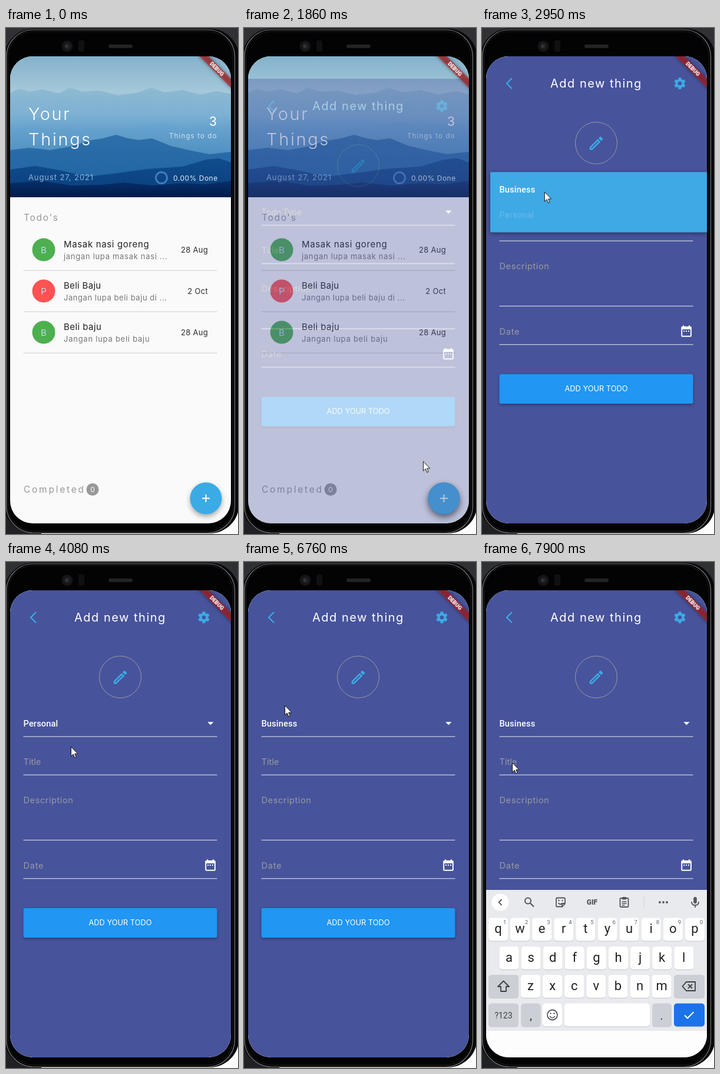
An HTML page for the animation above (8000 ms loop, 394 by 858 pixels).

```html
<!DOCTYPE html>
<html lang="en">
<head>
<meta charset="utf-8">
<title>Todo app</title>
<style>
html, body { margin: 0; width: 100%; height: 100%; overflow: hidden; background: #fff; }
svg { display: block; width: 394px; height: 858px; font-family: Inter, sans-serif; }
.rb { font-family: Roboto, sans-serif; }
.mid { text-anchor: middle; }
.end { text-anchor: end; }
</style>
</head>
<body>
<svg id="stage" viewBox="0 0 394 858"></svg>
<script>
const LOOP = 8000;
const ACCENT = '#3babe6', PAGE = '#47539b', HINT = '#999ba1';

// Timeline: each track is a list of [ms, css] turned into CSS keyframes.
let css = '';
function track(name, frames, ease = 'linear') {
  const body = frames.map(([ms, rule]) => `${ms / LOOP * 100}% {${rule}}`).join(' ');
  css += `@keyframes ${name} {${body}} .${name} {animation: ${name} ${LOOP}ms ${ease} infinite}\n`;
}
const op = v => `opacity:${v}`;
const fade = (name, a, b, c, d) =>
  track(name, [[0, op(0)], [a, op(0)], [b, op(1)], [c, op(1)], [d, op(0)], [LOOP, op(0)]]);
const show = (name, a, b) =>
  track(name, [[0, op(a ? 0 : 1)], [a || 1, op(1)], [b, op(b < LOOP ? 0 : 1)]], 'step-end');

// Drawing helpers
const text = (x, y, size, str, fill, ls = 0, more = '') =>
  `<text x="${x}" y="${y}" font-size="${size}" fill="${fill}" letter-spacing="${ls}" ${more}>${str}</text>`;
const rect = (x, y, w, h, fill, r = 0, more = '') =>
  `<rect x="${x}" y="${y}" width="${w}" height="${h}" rx="${r}" fill="${fill}" ${more}/>`;
const circle = (x, y, r, fill, more = '') =>
  `<circle cx="${x}" cy="${y}" r="${r}" fill="${fill}" ${more}/>`;
const path = (d, fill, more = '') => `<path d="${d}" fill="${fill}" ${more}/>`;
const line = (d, color, w, more = '') =>
  path(d, 'none', `stroke="${color}" stroke-width="${w}" ${more}`);
const group = (inner, more = '') => `<g ${more}>${inner}</g>`;
const grad = (id, ...stops) =>
  `<linearGradient id="${id}" x2="0" y2="1">${stops.map(([o, c]) =>
    `<stop offset="${o}" stop-color="${c}"/>`).join('')}</linearGradient>`;

const defs = `<defs>
  <clipPath id="screen">${rect(7, 48, 375, 792, '#000', 38)}</clipPath>
  <clipPath id="fab">${circle(339.5, 797.5, 27, '#000')}</clipPath>
  ${grad('sky', [0, '#84b2cb'], [.25, '#a5c8da'], [.45, '#86b6d5'], [1, '#3f86bd'])}
  ${grad('far', [0, '#8fbad1'], [.25, '#7cb0d3'], [.6, '#4389c0'], [1, '#2f78b3'])}
  ${grad('haze', [0, '#6ba6d0'], [1, '#2c73af'])}
  ${grad('peak', [0, '#2d6fa8'], [1, '#1c62a3'])}
  ${grad('hill', [0, '#104c8b'], [1, '#0a3f7d'])}
  ${grad('front', [0, '#06306a'], [1, '#011b4b'])}
</defs>`;

function phone() {
  return rect(0, 0, 394, 858, '#fcfcfc') + rect(0, 0, 394, 60, '#303135')
    + rect(0, 780, 60, 78, '#202124')
    + rect(-3, 1, 399, 856, '#08080a', 50)
    + rect(.8, 3, 387.7, 853, '#050506', 46, 'stroke="#77797c" stroke-width="1.2"')
    + rect(3.5, 6, 382, 847, '#030303', 43, 'stroke="#1b1c1e"')
    + circle(104, 31, 9.5, '#151517') + circle(104, 31, 5, '#232326') + circle(103, 31, 2, '#3c3c42')
    + rect(123, 21, 10, 19, '#101012', 3)
    + rect(174, 28, 41, 6, '#222325', 3);
}

function ridge(points, fill) {
  return path(`M7 287 L${points} L382 287Z`, fill);
}

function header() {
  return rect(7, 48, 375, 239, 'url(#sky)')
    + ridge('7 110 22 103 40 108 62 104 90 111 108 101 130 108 158 106 190 114 222 110 246 101 270 109 300 105 330 113 358 107 382 112', 'url(#far)')
    + ridge('7 172 50 166 95 176 140 170 190 178 245 163 270 160 300 170 345 165 382 172', 'url(#haze)')
    + ridge('7 207 40 203 75 207 110 201 140 191 165 187 187 181 207 187 226 190 248 187 280 200 310 207 345 214 382 210', 'url(#peak)')
    + ridge('7 240 50 234 90 241 140 252 190 246 240 239 300 235 340 223 362 221 382 228', 'url(#hill)')
    + ridge('7 263 60 259 110 267 160 266 200 262 250 267 300 263 340 265 382 259', 'url(#front)')
    + text(38, 156, 29, 'Your', '#fff', 2.6, 'font-weight="300"')
    + text(38, 199, 29, 'Things', '#fff', 2.7, 'font-weight="300"')
    + text(358, 166, 21, '3', '#fff', 0, 'class="end"')
    + text(277, 187, 11.5, 'Things to do', '#d3e2ef', 1.15)
    + text(38, 258, 13, 'August 27, 2021', '#8fb2d6', .9)
    + circle(264, 254, 9.5, 'none', 'stroke="#3f7fbd" stroke-width="3"')
    + text(284, 259, 12, '0.00% Done', '#e3ecf5', .5);
}

function todo(y, color, name, ls, note, noteLs, date) {
  return circle(64, y, 19.5, color)
    + text(64, y + 6, 15, name[0] === 'B' && date === '2 Oct' ? 'P' : 'B', '#b9dcf0', 0, 'class="mid"')
    + text(98, y - 4, 15, name, '#222', ls)
    + text(98, y + 15.5, 13, note, '#777', noteLs)
    + text(343, y + 4.5, 13, date, '#2c2c2c', .3, 'class="end"')
    + rect(29.5, y + 34.5, 329, 1.2, '#d3d6d3');
}

function home() {
  const splash = circle(0, 0, 56, '#fff', 'class="splash"');
  return rect(7, 48, 375, 792, '#fafafa') + header()
    + text(30, 326.5, 15.5, 'Todo\'s', '#999', 1.7)
    + todo(376, '#4caf50', 'Masak nasi goreng', .65, 'jangan lupa masak nasi ...', .7, '28 Aug')
    + todo(446, '#ff5252', 'Beli Baju', .3, 'Jangan lupa beli baju di ...', .55, '2 Oct')
    + todo(516, '#4caf50', 'Beli baju', .45, 'Jangan lupa beli baju', .75, '28 Aug')
    + text(30, 788, 15.5, 'Completed', '#999', 2.75)
    + circle(147, 782.5, 10.5, '#989898') + text(147, 787, 12, '0', '#fff', 0, 'class="mid"')
    + circle(339.5, 797.5, 27, ACCENT, 'style="filter:drop-shadow(0 4px 4px #0005)"')
    + circle(339.5, 797.5, 27, ACCENT, 'class="lift" style="filter:drop-shadow(0 6px 7px #0006)"')
    + group(group(splash, 'transform="translate(318 800)"'), 'clip-path="url(#fab)"')
    + line('M333 797.5h13M339.5 791v13', '#fff', 2);
}

function gear(x, y) {
  const teeth = [0, 60, 120].map(a => rect(-2.6, -9.8, 5.2, 19.6, ACCENT, 1, `transform="rotate(${a})"`)).join('');
  return group(teeth + circle(0, 0, 7.4, ACCENT) + circle(0, 0, 3.3, PAGE), `transform="translate(${x} ${y})"`);
}

const PENCIL = 'M14.06 9.02l.92.92L5.92 19H5v-.92l9.06-9.06M17.66 3c-.25 0-.51.1-.7.29l-1.83 1.83 3.75 3.75 1.83-1.83c.39-.39.39-1.02 0-1.41l-2.34-2.34c-.2-.2-.45-.29-.71-.29zm-3.6 3.19L3 17.25V21h3.75L17.81 9.94z';
const CALENDAR = 'M19 4h-1V2h-2v2H8V2H6v2H5q-2 0-2 2v14q0 2 2 2h14q2 0 2-2V6q0-2-2-2zm0 16H5V9h14zM9 11H7v2h2zm4 0h-2v2h2zm4 0h-2v2h2z';
const option = (y, str, cls = '') =>
  group(text(29.5, y, 14.6, str, '#fff', .15, 'class="rb" font-weight="500"'), `class="${cls}"`);

function form() {
  return rect(7, 48, 375, 792, PAGE)
    + line('M51 85l-9 9 9 9', ACCENT, 2.2)
    + text(116, 101, 20, 'Add new thing', '#fff', 1.5)
    + gear(336, 94)
    + circle(194, 195, 35.5, 'none', 'stroke="#9a9ca2" stroke-width="1"')
    + path(PENCIL, ACCENT, 'transform="translate(179 180.5) scale(1.25)"')
    + group(text(29.5, 278.5, 14.6, 'Todo Type', HINT, .15, 'class="rb"'), 'class="hint"')
    + option(278.5, 'Personal', 'first') + option(278.5, 'Business', 'second')
    + path('M342.3 271.3h10.2l-5.1 5.2z', '#fff')
    + text(29.5, 344, 14.6, 'Title', HINT)
    + text(29.5, 409, 14.6, 'Description', HINT, .55)
    + text(29.5, 520, 14.6, 'Date', HINT, .7)
    + path(CALENDAR, '#fff', 'fill-rule="evenodd" transform="translate(335.3 502.2) scale(.98)"')
    + [296, 361, 471.5, 536.7].map(y => rect(29.5, y - .6, 329, 1.3, '#c9ccdd')).join('')
    + rect(29.5, 587, 329, 50, '#2196f3', 3, 'style="filter:drop-shadow(0 2px 2px #0005)"')
    + text(194, 616, 12.8, 'ADD YOUR TODO', '#fff', 0, 'class="mid"');
}

// Dropdown: fades in at one row, grows to both rows, then the other row appears.
const ROW = 43.75, ROW_TOP = 251.6, PAD = 7.3;
function menu(id, selected, opens, closes) {
  const top = ROW_TOP - selected * ROW;
  const small = `y:${ROW_TOP}px;height:${ROW}px`;
  const full = `y:${top - PAD}px;height:${2 * ROW + 2 * PAD}px`;
  fade(id, opens, opens + 75, closes, closes + 75);
  track(id + 'box', [[0, small], [opens + 75, small], [opens + 150, full], [LOOP, full]]);
  fade(id + 'row', opens + 150, opens + 270, closes + 100, closes + 110);
  const rows = ['Business', 'Personal'].map((name, i) =>
    option(top + i * ROW + 26.9, name, i === selected ? '' : id + 'row')).join('');
  return group(rect(14, ROW_TOP, 369, ROW, '#3fa9e5', 2,
    `class="${id}box" style="filter:drop-shadow(0 2px 3px #0006)"`) + rows, `class="${id}"`);
}

function keyboard() {
  const INK = '#202124', GREY = '#cdcfd6', ICON = '#52575c';
  const key = (x, y, w, fill = '#fff') =>
    rect(x, y + 1, w, 39, '#c3c5ca', 5) + rect(x, y, w, 39, fill, 5);
  const label = (x, y, size, str, fill = INK, more = '') =>
    text(x, y, size, str, fill, 0, `class="rb mid" ${more}`);
  const row = (letters, x0, y) => [...letters].map((c, i) => {
    const x = x0 + i * 37.1;
    return key(x - 16.5, y, 33) + label(x, y + 25.5, 22, c);
  }).join('');
  const digits = [...'1234567890'].map((c, i) => label(38.6 + i * 37.1, 614, 9.5, c, '#5f6368')).join('');
  const tools = circle(31, 577, 14.5, '#fff') + line('M33.5 572l-5 5 5 5', ICON, 1.8)
    + circle(78, 574.5, 5, 'none', `stroke="${ICON}" stroke-width="2"`) + line('M82 578.5l6 6', ICON, 2.2)
    + line('M128 569.5h11q2 0 2 2v8l-5 5h-8q-2 0-2-2v-11q0-2 2-2zM141 579h-5v5M129.5 578q3 4 6 1', ICON, 1.8)
    + circle(130.5, 574, 1.2, ICON) + circle(136.5, 574, 1.2, ICON)
    + label(187, 581, 12, 'GIF', ICON, 'font-weight="900"')
    + rect(234.5, 570, 14, 15, 'none', 1.5, `stroke="${ICON}" stroke-width="1.8"`)
    + rect(238, 568, 7, 4.5, ICON, 1) + line('M237.5 576h8M237.5 579h8M237.5 582h5', ICON, 1.4)
    + rect(274.5, 567, 1, 20, '#cfd1d5')
    + [302, 308, 314].map(x => circle(x, 577, 1.9, ICON)).join('')
    + rect(359.2, 568, 5.6, 11, ICON, 2.8) + line('M356 576q0 6 6 6t6-6M362 582v4', ICON, 1.8);
  const bottom = key(11, 748.5, 51, GREY) + label(36.5, 773.5, 14, '?123', '#3c4043')
    + key(66.5, 748.5, 33, GREY) + label(83, 776, 19, ',')
    + key(103, 748.5, 33) + circle(119.5, 768, 8.5, 'none', `stroke="${ICON}" stroke-width="1.8"`)
    + circle(116.5, 765.5, 1.3, ICON) + circle(122.5, 765.5, 1.3, ICON)
    + line('M115 770q4.500 6 9 0', ICON, 1.6)
    + key(140, 748.5, 145) + key(289, 748.5, 33, GREY) + label(305, 776, 19, '.')
    + key(326, 748.5, 52, '#1a73e8') + line('M344 768.500l5 5 10.500-10.500', '#fff', 2);
  return rect(7, 556, 375, 240, '#e8eaed') + rect(7, 795, 375, 45, '#fdfdfd')
    + tools + row('qwertyuiop', 27.5, 603.5) + digits + row('asdfghjkl', 46, 652)
    + key(11, 700, 51, GREY)
    + line('M36.500 710.500l-9.500 9.500h5v8h9v-8h5z', '#3c4043', 1.8, 'stroke-linejoin="round"')
    + row('zxcvbnm', 82.5, 700)
    + key(326, 700, 52, GREY)
    + line('M347 712h15v15h-15l-6.500-7.500zM350 716l7 7M357 716l-7 7', '#3c4043', 1.8)
    + bottom;
}

function banner() {
  return group(rect(-50, -5.5, 100, 11, '#b71c1c', 0, 'fill-opacity=".66" style="filter:drop-shadow(0 0 3px #000a)"')
    + text(0, 3.4, 9.3, 'DEBUG', '#fff', 0, 'class="rb mid" font-weight="900"'),
    'transform="translate(358 69.500) rotate(45)"');
}

// Page change, button press and field value
track('rise', [[0, 'transform:translateY(198px)'],
  [1740, 'transform:translateY(198px);animation-timing-function:cubic-bezier(.4,0,.2,1)'],
  [1970, 'transform:none'], [LOOP, 'transform:none']]);
track('appear', [[0, op(0)], [1740, op(0) + ';animation-timing-function:ease-in'],
  [1970, op(1)], [LOOP, op(1)]]);
track('lift', [[0, op(0)], [1490, op(0)], [1690, op(1)], [LOOP, op(1)]]);
track('splash', [[0, 'transform:scale(0);opacity:0'], [1490, 'transform:scale(.1);opacity:0'],
  [1560, 'transform:scale(.4);opacity:.14'], [1710, 'transform:scale(1);opacity:.14'],
  [1960, 'transform:scale(1);opacity:0'], [LOOP, 'transform:scale(1);opacity:0']]);
const PICK1 = 3620, PICK2 = 6440;
show('hint', 0, PICK1);
show('first', PICK1, PICK2);
show('second', PICK2, LOOP);
track('keys', [[0, 'transform:translateY(284px)'],
  [7620, 'transform:translateY(284px);animation-timing-function:cubic-bezier(0,0,.2,1)'],
  [7870, 'transform:none'], [LOOP, 'transform:none']]);

// Pointer stops: ms, x, y
const stops = [
  [0, 366, 862], [260, 366, 862], [600, 349, 725], [790, 337, 677], [1040, 327, 731],
  [1080, 326, 738], [1320, 317, 799], [1740, 317, 799], [1980, 291, 671], [2240, 190, 352],
  [2310, 170, 330], [2600, 104, 274], [2820, 104, 274], [3110, 108, 282], [3150, 109, 288],
  [3450, 113, 341], [3850, 113, 336], [4050, 113, 336], [4080, 110, 313], [4530, 85, 281],
  [4900, 85, 282], [5100, 60, 312], [5290, 72, 332], [5430, 72, 332], [5780, 76, 284],
  [6040, 76, 284], [6250, 72, 228], [6480, 72, 228], [6760, 69, 243], [6920, 69, 243],
  [7320, 50, 329], [7720, 50, 329], [7900, 51, 340], [LOOP, 51, 340]];
track('pointer', stops.map(([ms, x, y]) => [ms, `transform:translate(${x}px,${y}px)`]));

const stage = document.getElementById('stage');
stage.innerHTML = defs + phone()
  + group(home()
    + group(group(form(), 'class="rise"'), 'class="appear"')
    + menu('menuA', 0, 2780, PICK1) + menu('menuB', 1, 5874, PICK2)
    + group(keyboard(), 'class="keys"') + banner(), 'clip-path="url(#screen)"')
  + path('M.5.5V16.500L4.200 13 6.800 19 9.200 18 6.700 12.200H11.800Z', '#fff',
    'class="pointer" stroke="#111" stroke-width="1"');
document.head.appendChild(Object.assign(document.createElement('style'), { textContent: css }));
</script>
</body>
</html>
```
